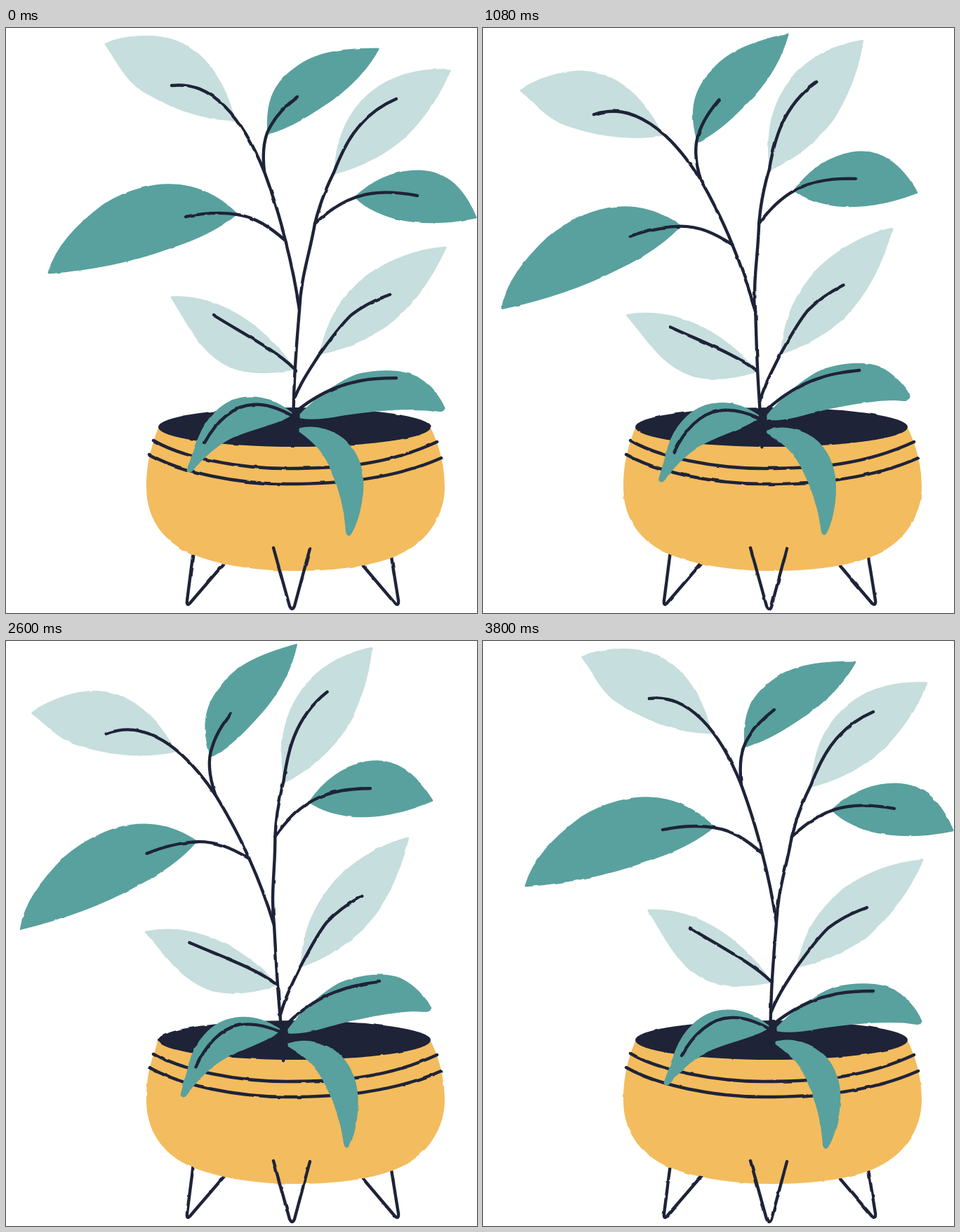
An HTML page that plays this animation: 671x834 px, repeating every 3.84 s.

```html
<!DOCTYPE html>
<html lang="en">
<head>
<meta charset="utf-8">
<title>Swaying plant</title>
<style>
  html, body { margin: 0; width: 100%; height: 100%; overflow: hidden; background: #fff; }
  svg { display: block; width: 100%; height: 100%; }
  path { stroke-linecap: round; stroke-linejoin: round; }
  .line { fill: none; stroke: #1e2338; stroke-width: 4.4; }
  .dark { fill: #59a19e; stroke: #59a19e; stroke-width: 3; }
  .light { fill: #c6dedd; stroke: #c6dedd; stroke-width: 3; }
  .pot { fill: #f3bc5e; }
  .soil { fill: #1e2338; }
</style>
</head>
<body>
<svg viewBox="0 0 671 834">
  <defs>
    <filter id="rough" filterUnits="userSpaceOnUse" x="0" y="0" width="671" height="834" color-interpolation-filters="sRGB">
      <feTurbulence id="noise" type="fractalNoise" baseFrequency="0.05" numOctaves="2" seed="1" result="n"/>
      <feDisplacementMap in="SourceGraphic" in2="n" scale="2.5" xChannelSelector="R" yChannelSelector="G"/>
    </filter>
  </defs>
  <g filter="url(#rough)">
    <path class="line" d="M267 746L258 816Q257 825 262 820L311 763"/>
    <path class="line" d="M509 767L554 820Q560 825 559 816L549 754"/>
    <path class="pot" d="M217 570C203 605 200 630 200 655C200 700 225 735 270 752C310 767 360 774 412 774C480 774 530 765 562 750C605 730 625 690 625 655C625 620 615 590 605 570Z"/>
    <ellipse class="soil" cx="411" cy="569" rx="194" ry="28"/>
    <path class="line" d="M210 588C250 612 330 628 400 628C480 628 545 622 614 590"/>
    <path class="line" d="M204 608C250 634 330 650 400 650C480 650 555 642 620 613"/>
    <path class="line" d="M381 741L404 824Q408 832 411 824L433 742"/>
    <g id="plant"></g>
  </g>
</svg>
<script>
const LOOP = 3840, STEP = 40;
const BASE = { x: 411, y: 760 };

// Class and resting outline of every moving part, back to front.
const parts = [
  ['light', 'M142 23C165 12 205 9 232 16C285 30 312 80 325 131C272 130 222 107 188 84C165 65 155 40 142 23Z'],
  ['dark', 'M530 30C480 30 440 35 412 58C378 82 371 112 374 150C410 140 440 118 464 102C492 82 515 57 530 30Z'],
  ['light', 'M632 60C590 58 550 68 522 91C490 117 473 150 468 207C515 195 545 175 568 155C595 128 618 95 632 60Z'],
  ['dark', 'M498 241C522 219 552 204 588 204C630 205 653 232 669 270C625 279 585 278 555 271C530 264 512 255 498 241Z'],
  ['dark', 'M61 349C72 312 100 282 140 252C175 230 215 222 240 224C275 226 305 242 328 265C300 288 265 303 230 314C175 334 120 344 61 349Z'],
  ['light', 'M236 384C280 382 320 400 352 424C378 446 396 464 409 486C375 493 345 492 320 483C275 462 260 420 236 384Z'],
  ['light', 'M626 313C585 316 545 332 514 354C478 385 460 412 448 464C485 457 515 442 542 424C580 394 605 358 626 313Z'],
  ['line', 'M408 594L410 530C411 480 415 440 418 402C412 360 405 330 398 303C390 268 380 238 368 205C352 165 335 135 312 112C288 88 265 79 236 82'],
  ['line', 'M418 402C420 355 432 325 440 279C447 250 455 230 467 206C480 172 500 125 556 101'],
  ['line', 'M368 205C364 170 370 150 378 138C388 120 402 108 415 98'],
  ['line', 'M440 279C465 255 490 240 520 236C545 232 570 236 586 239'],
  ['line', 'M398 303C375 283 355 270 330 266C305 262 280 264 256 269'],
  ['line', 'M410 485C385 460 340 437 295 409'],
  ['line', 'M410 530C420 505 432 488 446 466C460 447 475 425 492 409C510 395 530 386 547 380'],
  ['dark', 'M420 551C440 530 470 507 500 495C530 487 565 488 585 498C605 510 618 528 624 542C622 548 615 545 600 543C560 541 520 545 480 551C455 556 435 558 420 555Z'],
  ['dark', 'M406 549C385 532 365 526 346 527C310 528 285 558 275 585C269 605 262 620 259 630C262 635 266 630 270 624C285 608 300 594 322 583C350 570 385 565 406 551Z'],
  ['dark', 'M418 572C440 566 470 574 488 594C506 615 510 640 507 666C504 690 498 708 491 720C488 725 485 722 485 712C483 685 477 660 465 632C455 605 440 590 418 574Z'],
  ['line', 'M414 546C440 525 470 510 500 504C520 499 540 499 556 499'],
  ['line', 'M408 553C385 540 365 536 352 537C325 538 300 560 283 591']
];

const plant = document.getElementById('plant');
const noise = document.getElementById('noise');
const paths = parts.map(([cls, d]) => {
  const el = document.createElementNS('http://www.w3.org/2000/svg', 'path');
  el.setAttribute('class', cls);
  plant.appendChild(el);
  return { el, d };
});

// Lean of the spine at height h, and the sideways shift it adds up to.
const lean = h => 0.08 + 0.00026 * h + 1.7e-7 * h * h;
const shift = h => h * (0.08 + 0.00013 * h + 0.567e-7 * h * h);

function bend(x, y, k) {
  const h = BASE.y - y, side = x - BASE.x;
  const a = k * lean(h), mid = k * lean(h / 2), low = k * lean(0);
  const drop = 5 * k + 0.03 * h * (low * low + 4 * mid * mid + a * a);
  const px = BASE.x - k * shift(h) + side * Math.cos(a);
  const py = y + drop - side * Math.sin(a);
  return px.toFixed(2) + ' ' + py.toFixed(2);
}

let last = -1;
function draw(t) {
  const frame = Math.floor((t % LOOP) / STEP);
  if (frame === last) return;
  last = frame;
  const k = (1 - Math.cos(2 * Math.PI * frame * STEP / LOOP)) / 2 * 1.04;
  for (const { el, d } of paths) {
    el.setAttribute('d', d.replace(/(\d+) (\d+)/g, (_, x, y) => bend(+x, +y, k)));
  }
  noise.setAttribute('seed', frame + 1);
}

let start;
function tick(now) {
  if (start === undefined) start = now;
  draw(Math.max(0, now - start));
  requestAnimationFrame(tick);
}
draw(0);
requestAnimationFrame(tick);
</script>
</body>
</html>
```
